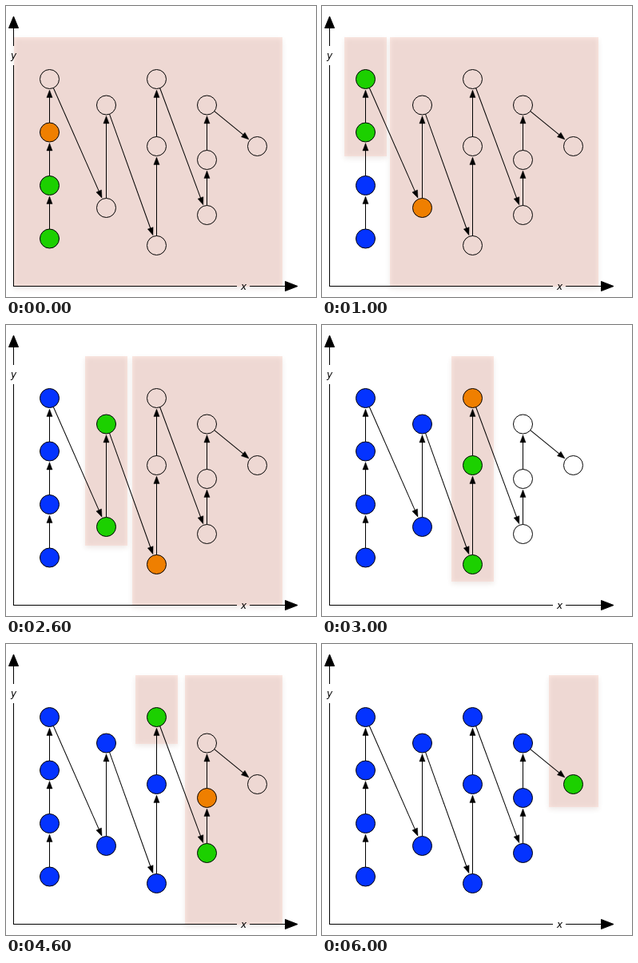
An HTML page that plays this animation: 388 px wide and 364 px high, repeating every 7000 ms.

```html
<!DOCTYPE html>
<html lang="en">
<head>
<meta charset="utf-8">
<title>Sweep along sorted points</title>
<style>
  html, body { margin: 0; width: 100%; height: 100%; overflow: hidden; background: #fff; }
  .zone {
    position: absolute; top: 39px; background: #eed8d3;
    box-shadow: inset 0 1px 6px rgba(255, 236, 230, .95), 0 3px 6px rgba(110, 60, 50, .11);
  }
  svg { position: absolute; left: 0; top: 0; }
  line, circle, path { stroke: #000; stroke-width: 1; }
  .head { stroke-width: .4; }
  text { font: italic 12px "DejaVu Sans", "Open Sans", sans-serif; text-anchor: middle; }
</style>
</head>
<body>
<div class="zone" id="near"></div>
<div class="zone" id="far"></div>
<svg id="plot" width="388" height="364" viewBox="0 0 388 364">
  <line x1="9.5" y1="351" x2="9.5" y2="74"/>
  <line x1="9.5" y1="50" x2="9.5" y2="27"/>
  <path d="M9.5 13L15.5 27.5H3.5Z"/>
  <line x1="9" y1="350.5" x2="289" y2="350.5"/>
  <line x1="305" y1="350.5" x2="350" y2="350.5"/>
  <path d="M365 350.5L349.5 344.5V356.5Z"/>
  <text x="9.5" y="66">y</text>
  <text x="297.5" y="355">x</text>
</svg>
<script>
const STEP = 1000, STEPS = 7, R = 12;
const TOP = 39, BOTTOM = 351, RIGHT = 346;
const BLUE = '#0433ff', GREEN = '#1cd000', ORANGE = '#ef7f00';

// Each column: centre, left border of its region, points from bottom to top
const columns = [
  { x: 54.5, start: 10, ys: [291, 224.5, 158, 91.5] },
  { x: 125.5, start: 85, ys: [252.5, 124] },
  { x: 188.5, start: 158, ys: [299.5, 175.5, 91.5] },
  { x: 251.5, start: 224, ys: [261.5, 192.5, 124] },
  { x: 314.5, start: 284, ys: [175.5] }
];
const points = columns.flatMap(col => col.ys.map(y => ({ x: col.x, y, col })));

const plot = document.getElementById('plot');
const near = document.getElementById('near');
const far = document.getElementById('far');

function add(tag, attrs) {
  const el = document.createElementNS('http://www.w3.org/2000/svg', tag);
  for (const key in attrs) el.setAttribute(key, attrs[key]);
  return plot.appendChild(el);
}

function arrow(a, b) {
  const dx = b.x - a.x, dy = b.y - a.y;
  const angle = Math.atan2(dy, dx) * 180 / Math.PI;
  const transform = `translate(${a.x} ${a.y}) rotate(${angle})`;
  const tip = Math.hypot(dx, dy) - R - 1.5;
  add('line', { x1: R, y1: 0, x2: tip - 8, y2: 0, transform });
  add('path', { class: 'head', d: `M${tip} 0l-9.5 -3.6v7.2Z`, transform });
}

points.slice(1).forEach((p, i) => arrow(points[i], p));
const nodes = points.map(p => add('circle', { cx: p.x, cy: p.y, r: R, fill: 'none' }));

// Two points are visited per step, and the next one is highlighted
function color(i, step) {
  const k = i - 2 * step;
  return k < 0 ? BLUE : k < 2 ? GREEN : k === 2 ? ORANGE : 'none';
}

function place(zone, visible, left, right, height) {
  zone.style.display = visible ? 'block' : 'none';
  zone.style.left = left + 'px';
  zone.style.width = right - left + 'px';
  zone.style.height = height + 'px';
}

function show(step) {
  nodes.forEach((node, i) => node.setAttribute('fill', color(i, step)));

  const { x, y, col } = points[2 * step];
  const next = points[2 * step + 2];
  const [left, right] = col === columns.at(-1) ? [col.start, RIGHT] : [x - 27, x + 26.5];
  place(near, step > 0, left, right, .94 * y);

  // The whole plane is open at first, later only the columns ahead
  const ahead = step === 0 ? col : next && next.col !== col && next.col;
  place(far, ahead, ahead ? ahead.start : 0, RIGHT, BOTTOM - TOP);
}

let shown = -1;
function draw() {
  const step = Math.floor(performance.now() / STEP) % STEPS;
  if (step !== shown) show(shown = step);
  requestAnimationFrame(draw);
}
draw();
</script>
</body>
</html>
```
